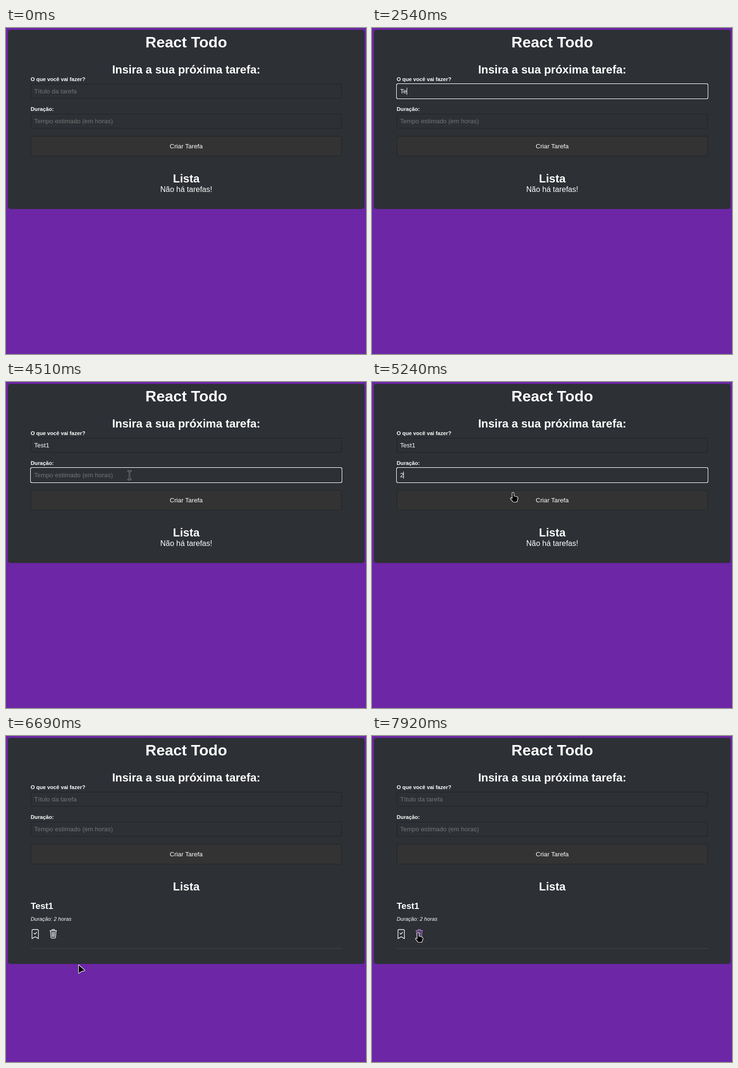
An HTML page that plays this animation: 758x688 px, repeating every 7.99 s.

```html
<!DOCTYPE html>
<html lang="pt">
<head>
<meta charset="utf-8">
<title>React Todo</title>
<style>
  html, body { margin: 0; width: 100%; height: 100%; overflow: hidden; background: #6d26a5; }
  svg { display: block; font-family: "Liberation Sans", Arial, sans-serif; }
  text { fill: #fff; white-space: pre; }
  .mid { text-anchor: middle; }
  .h1 { font-size: 32px; font-weight: bold; }
  .h2 { font-size: 24px; font-weight: bold; }
  .h3 { font-size: 18.72px; font-weight: bold; }
  .label { font-size: 11.2px; font-weight: bold; }
  .note { font-size: 11.2px; font-style: italic; }
  .form { font-size: 13.333px; }
  .hint { fill: #757575; }
  .box { fill: none; stroke: #1f2124; }
  .icon { fill: none; stroke: #fff; stroke-width: 1.3; stroke-linecap: round; stroke-linejoin: round; }
  .icon.hover { stroke: #b381dd; }
  .cursor { stroke-linejoin: round; stroke-linecap: round; }
  .solid { fill: #000; stroke: #eee; stroke-width: 1.2; }
  .off { display: none; }
</style>
</head>
<body>
<svg width="758" height="688" viewBox="0 0 758 688">
  <defs>
    <g id="frame" fill="none">
      <rect x="51.75" y="-.25" width="655.5" height="31.5" rx="3" stroke="#fff" stroke-width="1.5"/>
      <rect x="53" y="1" width="653" height="29" rx="1.5" stroke="#101010"/>
    </g>
    <path id="beam" fill="none" d="M-3 -9H-1.500L0 -8L1.500 -9H3M0 -8V8M-3 9H-1.500L0 8L1.500 9H3"/>
  </defs>

  <rect id="panel" x="4" y="4" width="751" height="378" rx="5" fill="#2d3035"/>
  <text class="h1 mid" x="379.5" y="41">React Todo</text>
  <text class="h2 mid" x="379.5" y="96">Insira a sua próxima tarefa:</text>

  <text class="label" x="52" y="112">O que você vai fazer?</text>
  <g class="field" transform="translate(0 118)">
    <rect class="box" x="52.5" y=".5" width="654" height="30" rx="2"/>
    <use class="ring" href="#frame"/>
    <text class="form hint" x="59.2" y="20">Título da tarefa</text>
    <text class="form value" x="59.2" y="20"></text>
    <rect class="caret" y="8" width="1" height="15" fill="#fff"/>
  </g>

  <text class="label" x="52" y="175">Duração:</text>
  <g class="field" transform="translate(0 181)">
    <rect class="box" x="52.5" y=".5" width="654" height="30" rx="2"/>
    <use class="ring" href="#frame"/>
    <text class="form hint" x="59.2" y="20">Tempo estimado (em horas)</text>
    <text class="form value" x="59.2" y="20"></text>
    <rect class="caret" y="8" width="1" height="15" fill="#fff"/>
  </g>

  <rect x="52.5" y="228.5" width="654" height="42" rx="4" fill="#333" stroke="#202225"/>
  <text class="form mid" x="379.5" y="254">Criar Tarefa</text>

  <text class="h2 mid" x="379.5" y="326">Lista</text>
  <text id="empty" class="mid" x="379.5" y="346" font-size="16">Não há tarefas!</text>
  <g id="task">
    <text class="h3" x="52" y="365">Test1</text>
    <text class="note" x="52" y="390">Duração: 2 horas</text>
    <g class="icon" transform="translate(61.5 418)">
      <path d="M-6.800 9.600V-7.500q0 -2 2 -2h9.600q2 0 2 2V9.600L0 5.600ZM-2.700 -1.700l2 2 3.800 -4"/>
    </g>
    <g id="trash" class="icon" transform="translate(99.5 418)">
      <path d="M-7.300 -7.200H7.300M-3 -7.400q0 -2.100 1.200 -2.100h3.600q1.200 0 1.200 2.100"/>
      <path d="M-5.900 -7l1.100 14q.2 1.700 1.900 1.700h5.800q1.700 0 1.900 -1.700l1.100 -14"/>
      <path d="M-2.600 -4.300l.4 10M0 -4.300v10M2.600 -4.300l-.4 10"/>
    </g>
    <path d="M52 448.500H707" stroke="#45484c"/>
  </g>

  <g id="pointer">
    <circle id="click" cx="-1" cy="-1" r="12" fill="#8f8d1f"/>
    <g class="cursor" id="text">
      <use href="#beam" stroke="#8f9194" stroke-width="2.8"/>
      <use href="#beam" stroke="#202225" stroke-width="1.2"/>
    </g>
    <path class="cursor solid" id="hand" d="M-2 2Q-2 0 0 0Q2 0 2 2V7.500L8 9Q10.500 9.800 10.300 12.500L9 18Q8.300 20.500 6 20.500H1.500Q0 20.500 -1 19L-5.300 13.700Q-6 11.500 -4 11.300L-2 12.700Z"/>
    <path class="cursor solid" id="arrow" d="M.7 1.500Q.7 .3 1.700 1.200L13.700 12Q14.700 13.300 13 13.700Q8 14 5.500 16L2 18.700Q.7 19.300 .7 18Z"/>
  </g>
</svg>
<script>
const LOOP = 7990, STEP = 70, BLINK = 530, LEFT = 59;
const ADDED = 5920;
const $ = id => document.getElementById(id);
const show = (el, on) => el.classList.toggle('off', !on);
const within = (v, a, b) => v >= a && v < b;

// Each move is one curve from a point, bent towards another, to a third
const moves = [
  { at: 300, steps: 8, from: [715, 670], bend: [310, 130], to: [264, 194] },
  { at: 1010, steps: 2, from: [258, 178], bend: [248, 155], to: [246, 140] },
  { at: 3620, steps: 4, from: [246, 140], bend: [254, 322], to: [260, 197] },
  { at: 5040, steps: 4, from: [260, 197], bend: [308, 243], to: [312, 249] },
  { at: ADDED, steps: 8, from: [312, 249], bend: [330, 297], to: [245, 479] },
  { at: 6610, steps: 11, from: [185, 486], bend: [-13, 469], to: [148, 342] },
  { at: 7450, steps: 6, from: [152, 335], bend: [150, 325], to: [97, 415] }
];

const clicks = [1150, 3970, 5780];
const inputs = [
  { focus: 1280, blur: 3970, keys: { 2340: 'T', 2540: 'e', 2740: 'st', 3620: '1' } },
  { focus: 3970, blur: 5780, keys: { 5040: '2' } }
];
const fields = [...document.querySelectorAll('.field')].map((el, i) => ({
  ...inputs[i],
  part: name => el.querySelector('.' + name)
}));

function pointerAt(t) {
  const move = moves.filter(m => t >= m.at).pop();
  if (!move) return null;
  const p = Math.min(1, Math.floor((t - move.at) / STEP) / move.steps), q = 1 - p;
  return [0, 1].map(i => q * q * move.from[i] + 2 * p * q * move.bend[i] + p * p * move.to[i]);
}

function cursorFor(x, y, overTrash) {
  const inForm = within(x, 52, 707);
  if (overTrash || inForm && within(y, 228, 271)) return 'hand';
  return inForm && (within(y, 118, 149) || within(y, 181, 212)) ? 'text' : 'arrow';
}

function drawField({ focus, blur, keys, part }, t) {
  const pressed = Object.keys(keys).filter(k => t >= k);
  const typed = t < ADDED ? pressed.map(k => keys[k]).join('') : '';
  const value = part('value'), caret = part('caret');
  const focused = within(t, focus, blur);
  const awake = Math.max(focus, ...pressed);
  value.textContent = typed;
  show(part('hint'), !typed);
  show(part('ring'), focused);
  show(caret, focused && Math.floor((t - awake) / BLINK) % 2 === 0);
  caret.setAttribute('x', Math.floor(LEFT + (typed ? value.getComputedTextLength() : 0)));
}

function drawPointer(t, added) {
  const at = pointerAt(t);
  const typing = within(t, 1740, 3690) || within(t, 5040, 5110);
  show($('pointer'), at && !typing);
  if (!at) return;
  const [x, y] = at;
  const overTrash = added && within(x, 90, 110) && within(y, 406, 430);
  const kind = cursorFor(x, y, overTrash);
  $('pointer').setAttribute('transform', `translate(${x} ${y})`);
  for (const id of ['text', 'hand', 'arrow']) show($(id), id === kind);
  show($('click'), clicks.some(c => within(t, c, c + 2 * STEP)));
  $('trash').classList.toggle('hover', overTrash);
}

function draw(t) {
  const added = t >= ADDED;
  $('panel').setAttribute('height', added ? 477 : 378);
  show($('task'), added);
  show($('empty'), !added);
  $('trash').classList.remove('hover');
  fields.forEach(f => drawField(f, t));
  drawPointer(t, added);
}

const began = performance.now();
function tick() {
  draw((performance.now() - began) % LOOP);
  requestAnimationFrame(tick);
}
tick();
</script>
</body>
</html>
```
